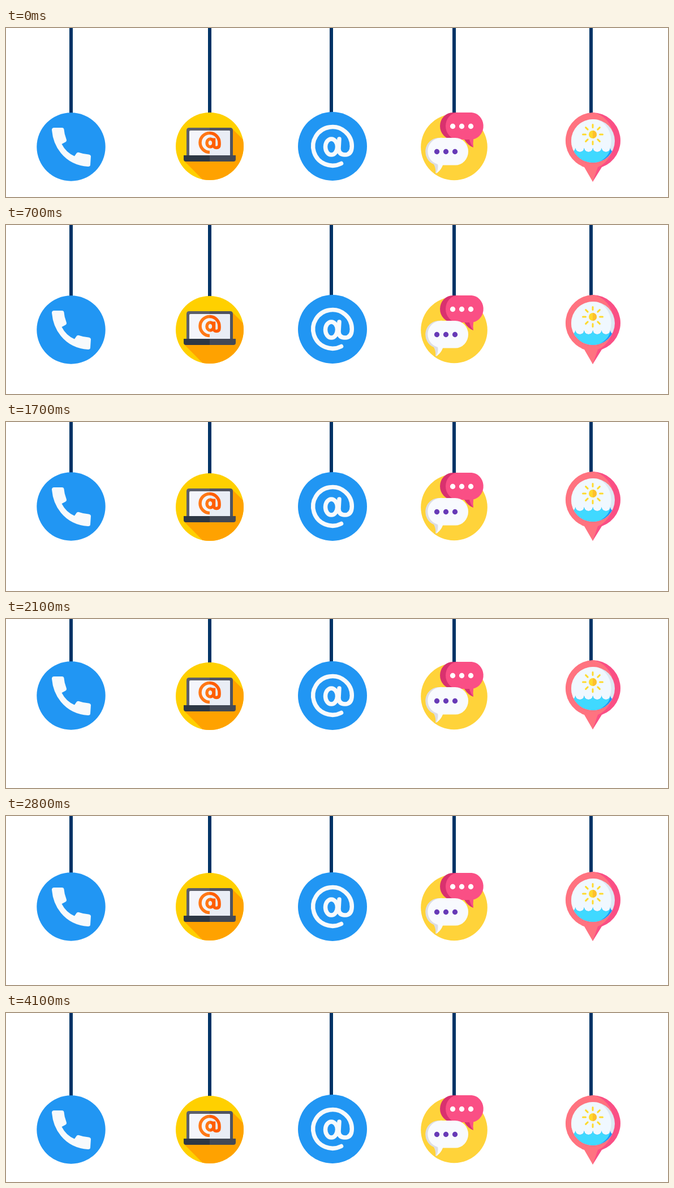
An HTML page for the animation above (4.2 s loop, 1170x300 px).

```html
<!DOCTYPE html>
<html lang="en">
<head>
<meta charset="utf-8">
<title>Hanging contact icons</title>
<style>
  html, body { margin: 0; width: 100%; height: 100%; overflow: hidden; background: #fff; }
  svg { display: block; }
  .cord { stroke: #036; stroke-width: 6; }
  .round { fill: none; stroke-linecap: round; stroke-linejoin: round; }
</style>
</head>
<body>
<svg width="1170" height="300" viewBox="0 0 1170 300">
  <defs>
    <clipPath id="disc"><circle cx="360" cy="210" r="60"/></clipPath>
    <clipPath id="porthole"><circle cx="1037.5" cy="200.5" r="38.5"/></clipPath>
    <linearGradient id="orange">
      <stop offset=".5" stop-color="#ff7816"/><stop offset=".5" stop-color="#ff5d00"/>
    </linearGradient>
    <linearGradient id="lid">
      <stop offset=".5" stop-color="#5c5f6b"/><stop offset=".5" stop-color="#4f5360"/>
    </linearGradient>
    <linearGradient id="base">
      <stop offset=".5" stop-color="#2d3744"/><stop offset=".5" stop-color="#434956"/>
    </linearGradient>
  </defs>

  <!-- Phone -->
  <g data-rise="75">
    <path class="cord" d="M115-10V152"/>
    <circle cx="115" cy="211" r="60.7" fill="#2196f3"/>
    <path fill="#f8fafc" d="M81 181Q81 177 85 177H99Q102 177 102.5 180Q103 188 106.5 197Q108 201 105 202.5L98.5 206Q106 221 121 227.500L124.500 222.500Q126 220 129 221Q137 224 146 224.500Q150 225 150 228L149 243Q149 246 145 246Q115 244 97 222Q83 205 81 181Z"/>
  </g>

  <!-- Laptop -->
  <g data-rise="73.3">
    <path class="cord" d="M360-10V152"/>
    <circle cx="360" cy="210" r="60" fill="#ffd000"/>
    <path clip-path="url(#disc)" fill="#ffa200" d="M399 178L440 219V290H368L315 236Z"/>
    <path fill="url(#lid)" d="M319 228V182Q319 177 324 177H396Q401 177 401 182V228Z"/>
    <path fill="#f4f5fb" d="M324 227V184Q324 182 326 182H394Q396 182 396 184V227Z"/>
    <path fill="#e9edf5" d="M360 182H394Q396 182 396 184V227H360Z"/>
    <path fill="url(#base)" d="M314 226H406V233Q406 237 402 237H318Q314 237 314 233Z"/>
    <g fill="none" stroke="url(#orange)" stroke-width="5.5">
      <path d="M360 220.500A17 17 0 1 1 377 204V207Q377 212.500 372 212.500T367.500 208V195.500"/>
      <ellipse cx="361" cy="204" rx="6" ry="7"/>
    </g>
  </g>

  <!-- At sign -->
  <g data-rise="74">
    <path class="cord" d="M575-10V152"/>
    <circle cx="577" cy="210" r="61" fill="#2196f3"/>
    <g class="round" stroke="#f8fafc" stroke-width="7.500">
      <path d="M592.500 240.500A34.300 34.300 0 1 1 611.300 210Q611 225 599 225Q588 225 588 214L589 197"/>
      <ellipse cx="575" cy="211" rx="10.500" ry="14"/>
    </g>
  </g>

  <!-- Chat -->
  <g data-rise="74">
    <path class="cord" d="M792-10V155"/>
    <circle cx="792" cy="211.500" r="58.800" fill="#ffd33a"/>
    <path fill="#d9316e" d="M790 150H822V197H826Q824 205 826 212Q817 209 810 198H790A23 24 0 0 1 790 150Z"/>
    <path fill="#fa4f85" d="M799 150H823A22 24 0 0 1 826 197.500Q825 206 826 212Q821 207 819 198H799A22 24 0 0 1 799 150Z"/>
    <path fill="#dcdde3" d="M763 195H792V243H772Q767 254 759 258Q760 249 756 242A24 24.500 0 0 1 763 195Z"/>
    <path fill="#f8fafe" d="M772 195H794A23 24.300 0 0 1 794 243.600H772Q768 254 760 258Q765 249 763 242A24 24 0 0 1 772 195Z"/>
    <g class="round" stroke-width="9.300">
      <path stroke="#fff" d="M789.500 174.500h.01m16 0h.01m16 0h.01"/>
      <path stroke="#673ab7" d="M761.500 219.500h.01m16 0h.01m16 0h.01"/>
    </g>
  </g>

  <!-- Beach pin -->
  <g data-rise="77">
    <path class="cord" d="M1034-10V153"/>
    <path fill="#fa4f85" d="M1037 150A50 50 0 0 1 1053 247L1037 273L1030 248Z"/>
    <path fill="#ff7380" d="M1037 150A42 50 0 0 1 1046 247L1037 273L1022 247A50 50 0 0 1 1037 150Z"/>
    <g clip-path="url(#porthole)">
      <path fill="#dde8f3" d="M998 160H1078V242H998Z"/>
      <ellipse cx="1033" cy="200" rx="36.500" ry="40" fill="#f0f8ff"/>
      <path id="sea" fill="#2196f3"/>
      <path id="shallows" fill="#40d9ff"/>
    </g>
    <circle cx="1037" cy="189" r="7" fill="#ffda2d"/>
    <path fill="#fdbf2d" d="M1037 182a7 7 0 0 1 0 14Z"/>
    <path id="rays" class="round" stroke="#ffda2d" stroke-width="3"/>
  </g>
</svg>

<script>
const byId = id => document.getElementById(id);

// Scalloped surface: tips point up, the sky dips between them.
const surface = "M991 213" + "q1 7 7.7 7t7.700-7".repeat(6);
byId("sea").setAttribute("d", surface + "V242H991Z");
byId("shallows").setAttribute("d", "M991 213" + "q1 7 7.7 7t7.700-7".repeat(5) + "Q1067 230 1040 242H991Z");

let rays = "";
for (let i = 0; i < 8; i++) {
  const c = Math.cos(i * Math.PI / 4), s = Math.sin(i * Math.PI / 4);
  rays += `M${1037 + 12.5 * c} ${189 + 12.5 * s}L${1037 + 17.5 * c} ${189 + 17.5 * s}`;
}
byId("rays").setAttribute("d", rays);

// Steady rise and fall in 42 steps of 100 ms, on whole pixels.
const icons = document.querySelectorAll("[data-rise]");
function draw() {
  const step = Math.floor(performance.now() / 100) % 42;
  const height = Math.min(step, 42 - step) / 21;
  for (const icon of icons)
    icon.setAttribute("transform", `translate(0 ${-Math.round(icon.dataset.rise * height)})`);
  requestAnimationFrame(draw);
}
draw();
</script>
</body>
</html>
```
